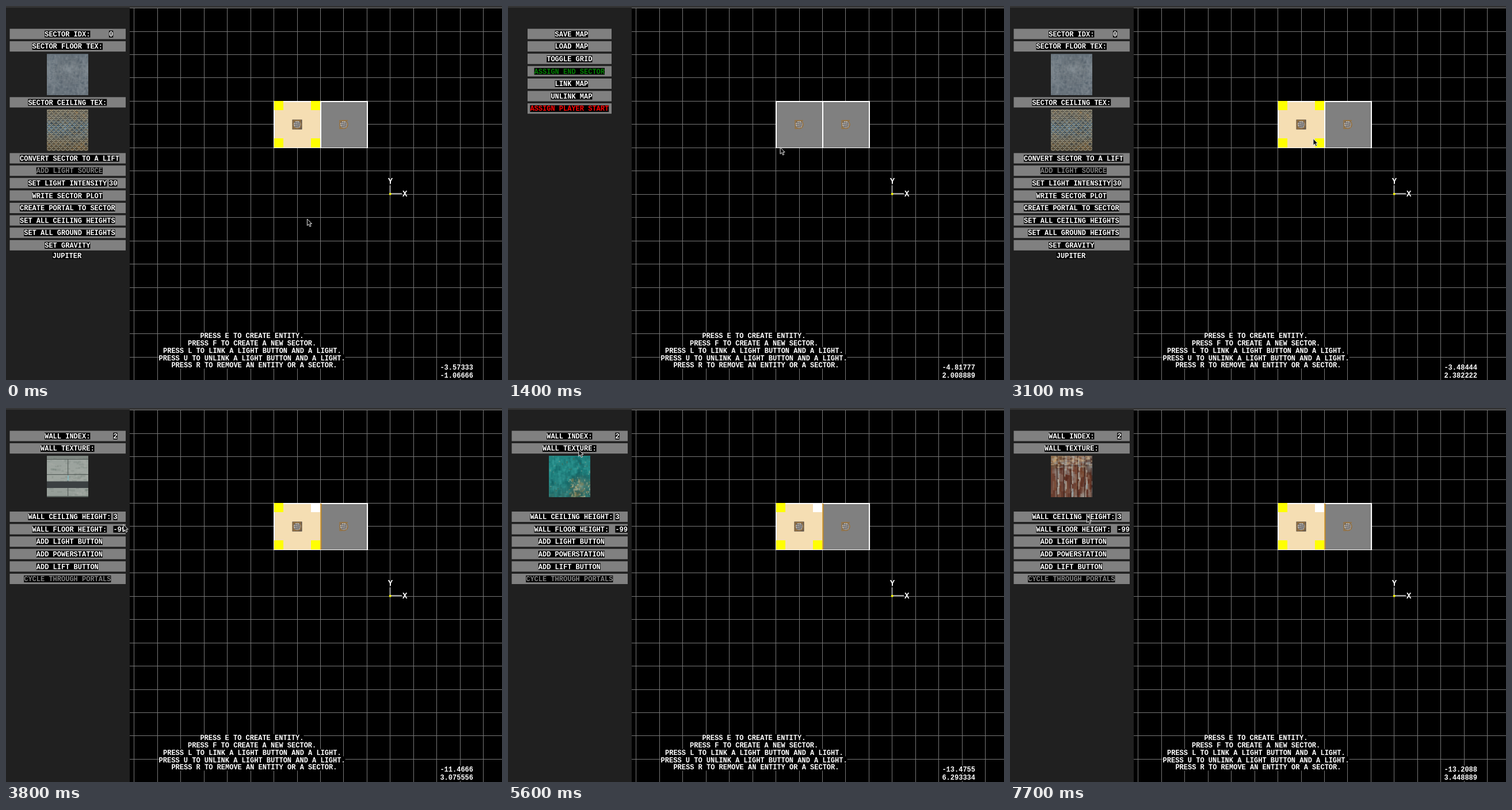
An HTML page with a canvas for the animation above (8 s loop, 862 by 650 pixels).

```html
<!DOCTYPE html>
<html lang="en">
<head>
<meta charset="utf-8">
<title>Map editor</title>
<style>
  html, body { margin: 0; width: 100%; height: 100%; overflow: hidden; background: #000; }
  #stage { position: relative; width: 862px; height: 650px; overflow: hidden; }
  #stage > * { position: absolute; left: 0; top: 0; }
  text { font: bold 12px "Liberation Mono", monospace; white-space: pre; }
  .axis { font-size: 14px; }
  .crisp { shape-rendering: crispEdges; }
</style>
</head>
<body>
<div id="stage">
  <svg id="scene" width="862" height="650"></svg>
  <svg id="cursor" width="14" height="18" viewBox="-1 -1 14 18">
    <path d="M0 0V11.6L2.7 9.2L4.6 13.4L6.7 12.5L4.8 8.4H8.2Z" fill="#111" stroke="#e8e8e8"/>
  </svg>
</div>
<script>
const LOOP = 8000, STEP = 100, CHAR = 7.2;
const ORIGIN = { x: 667.9, y: 326.9 }, CELL = 40.45, UNIT = 56.25;
const DIM = '#808080';
const stage = document.getElementById('stage');
const scene = document.getElementById('scene');
const cursor = document.getElementById('cursor');

const rect = (x, y, w, h, fill, extra = '') =>
  `<rect x="${x}" y="${y}" width="${w}" height="${h}" fill="${fill}" ${extra}/>`;
const line = (x1, y1, x2, y2, color, width = 1) =>
  `<path d="M${x1} ${y1}L${x2} ${y2}" stroke="${color}" stroke-width="${width}"/>`;
const label = (x, y, text, color = '#fff', id = '') =>
  rect(x, y - 5.8, text.length * CHAR, 11.8, '#000') +
  `<text x="${x}" y="${y + 4.2}" fill="${color}" ${id && `id="${id}"`}>${text}</text>`;

// Panel rows: slot, column, caption, colour, value
function panel(id, left, width, valueX, rows) {
  const body = rows.map(([slot, col, text, color, value]) => {
    const y = 48.6 + 21.6 * slot;
    return rect(left, y - 9, width, 18, DIM) + label(9.6 + CHAR * col, y, text, color) +
      (value ? label(valueX, y, value) : '');
  }).join('');
  return `<g id="${id}">${body}${id === 'sectorPanel' ? label(80.8, 433.6, 'JUPITER') : ''}</g>`;
}

function grid() {
  let out = '';
  for (let i = 0; i < 16; i++) {
    const x = Math.floor(222.9 + i * CELL) + .5, y = Math.floor(3.6 + i * CELL) + .5;
    out += line(x, 3, x, 650, '#777') + line(215, y, 862, y, '#777');
  }
  return `<g class="crisp">${out}</g>`;
}

function lamp(x, y, id = '') {
  let mesh = '';
  for (let i = -4; i <= 4; i += 4) mesh += `M${x - 6} ${y + i}l12 ${-i / 2}M${x + i} ${y - 6}l${-i / 2} 12`;
  return (id && rect(x - 8, y - 8, 16, 16, '#75624b', `id="${id}" stroke="#4c4540"`)) +
    `<circle cx="${x}" cy="${y}" r="7" fill="#b9b5ae" stroke="#95703f" stroke-width="1.6"/>` +
    `<path d="${mesh}" stroke="#5c5a5c" stroke-width=".9"/>` +
    `<path d="M${x - 7} ${y - 3}V${y - 7}H${x + 7}M${x - 7} ${y + 3}v4h4" fill="none" stroke="#98733f" stroke-width="1.3"/>`;
}

const handle = (x, y, id = '') => rect(x, y, 16, 16, '#ff0', id && `id="${id}"`);
const help = [
  [337.4, 'PRESS E TO CREATE ENTITY.'],
  [316, 'PRESS F TO CREATE A NEW SECTOR.'],
  [273, 'PRESS L TO LINK A LIGHT BUTTON AND A LIGHT.'],
  [265.6, 'PRESS U TO UNLINK A LIGHT BUTTON AND A LIGHT.'],
  [287.4, 'PRESS R TO REMOVE AN ENTITY OR A SECTOR.']
];

scene.innerHTML =
  rect(0, 0, 862, 650, '#000') + grid() +
  rect(0, 0, 862, 3, '#343434') + rect(0, 3, 215, 647, '#202020') +
  rect(466, 166, 81, 80.5, DIM, 'id="sector"') + rect(547, 166, 81, 80.5, DIM) +
  `<path class="crisp" d="M466 166H628V246.5H466ZM547 166V246.5" fill="none" stroke="#fff" stroke-width="1.6"/>` +
  `<g id="handles">${handle(466, 165)}${handle(530, 165, 'corner')}${handle(466, 230)}${handle(530, 230)}</g>` +
  `<g id="wall">${line(547.3, 166, 547.3, 246, '#c98a1c', 2)}${line(628.3, 166, 628.3, 247, '#fff', 1.6)}</g>` +
  lamp(506, 206, 'lampBox') + lamp(587, 206) +
  line(667.5, 312, 667.5, 327, '#ddd', 1.4) + line(668, 326, 688, 326, '#ddd', 1.4) +
  rect(666, 325, 3.4, 3.4, '#ff0') +
  '<text class="axis" x="663.8" y="309" fill="#fff">Y</text><text class="axis" x="689" y="331" fill="#fff">X</text>' +
  help.map(([x, text], i) => label(x, 572.6 + 12.9 * i, text)).join('') +
  label(754.4, 627.4, '        ', '#fff', 'readX') + label(754.4, 641.8, '        ', '#fff', 'readY') +
  panel('mapPanel', 34, 146, 0, [
    [0, 10, 'SAVE MAP'], [1, 10, 'LOAD MAP'], [2, 8, 'TOGGLE GRID'],
    [3, 5, 'ASSIGN END SECTOR', '#008000'], [4, 10, 'LINK MAP'], [5, 9, 'UNLINK MAP'],
    [6, 4, 'ASSIGN PLAYER START', '#f00']
  ]) +
  panel('sectorPanel', 6.5, 201.5, 179, [
    [0, 8, 'SECTOR IDX:', '#fff', '0'], [1, 5, 'SECTOR FLOOR TEX:'], [5.5, 4, 'SECTOR CEILING TEX:'],
    [10, 2, 'CONVERT SECTOR TO A LIFT'], [11, 6, 'ADD LIGHT SOURCE', DIM],
    [12, 4, 'SET LIGHT INTENSITY', '#fff', '30'], [13, 5, 'WRITE SECTOR PLOT'],
    [14, 2, 'CREATE PORTAL TO SECTOR'], [15, 2, 'SET ALL CEILING HEIGHTS'],
    [16, 3, 'SET ALL GROUND HEIGHTS'], [17, 8, 'SET GRAVITY']
  ]) +
  panel('wallPanel', 6.5, 201.5, 186.4, [
    [0, 8, 'WALL INDEX:', '#fff', '2'], [1, 7, 'WALL TEXTURE:'],
    [6.5, 4, 'WALL CEILING HEIGHT:', '#fff', '3'], [7.5, 5, 'WALL FLOOR HEIGHT:', '#fff', '-99'],
    [8.5, 6, 'ADD LIGHT BUTTON'], [9.5, 6, 'ADD POWERSTATION'], [10.5, 6, 'ADD LIFT BUTTON'],
    [11.5, 3, 'CYCLE THROUGH PORTALS', DIM]
  ]);

function texture(top, paint) {
  const canvas = document.createElement('canvas');
  canvas.width = canvas.height = 72;
  canvas.style.cssText = `left:71px;top:${top}px`;
  stage.insertBefore(canvas, cursor);
  const g = canvas.getContext('2d');
  let seed = 7;
  const rnd = () => (seed = seed * 16807 % 2147483647) / 2147483647;
  const fill = (color, x = 0, y = 0, w = 72, h = 72) => { g.fillStyle = color; g.fillRect(x, y, w, h); };
  const shade = (...colors) => {
    const grad = g.createLinearGradient(0, 0, 0, 72);
    colors.forEach((c, i) => grad.addColorStop(i / (colors.length - 1), c));
    fill(grad);
  };
  const glow = (x, y, r, color) => {
    const grad = g.createRadialGradient(x, y, 0, x, y, r);
    grad.addColorStop(0, color);
    grad.addColorStop(1, 'transparent');
    fill(grad);
  };
  const specks = (count, colors, w, h, x = 0, y = 0, spanX = 72, spanY = 72) => {
    for (let i = 0; i < count; i++)
      fill(colors[i % colors.length], x + rnd() * spanX, y + rnd() * spanY, w * (.4 + rnd()), h * (.4 + rnd()));
  };
  paint({ g, rnd, fill, shade, glow, specks });
  return canvas;
}

const concrete = texture(83, p => {
  p.shade('#68737c', '#7b858c', '#747e86', '#68727a');
  p.glow(38, 28, 30, 'rgba(150,160,165,.35)');
  p.specks(500, ['rgba(155,165,170,.14)', 'rgba(60,72,84,.14)'], 3, 4);
  p.fill('rgba(60,70,78,.5)', 0, 0, 72, 1);
});

const tread = texture(180, p => {
  p.shade('#77705f', '#75736a', '#607d90', '#67757a', '#75664c', '#514735');
  p.glow(32, 30, 26, 'rgba(150,185,205,.45)');
  p.specks(170, ['rgba(145,108,58,.3)', 'rgba(42,53,60,.35)'], 5, 4);
  p.g.lineWidth = 1.3;
  for (let j = 0; j < 18; j++) for (let i = 0; i < 18; i++) {
    const tilt = (i + j) % 2 ? 1.5 : -1.5, x = i * 4 + 2, y = j * 4 + 2;
    for (const [offset, color] of [[1, 'rgba(25,27,28,.75)'], [0, 'rgba(195,190,165,.65)']]) {
      p.g.strokeStyle = color;
      p.g.beginPath();
      p.g.moveTo(x - 1.6, y - tilt + offset);
      p.g.lineTo(x + 1.6, y + tilt + offset);
      p.g.stroke();
    }
  }
});

const panels = texture(83, p => {
  p.shade('#99a19c', '#a0a7a1', '#939c96');
  p.specks(150, ['rgba(185,190,183,.15)', 'rgba(75,85,80,.13)'], 7, 3);
  p.fill('#7b837e', 0, 0, 72, 4);
  p.fill('#505854', 0, 5, 72, 1.5);
  p.fill('#5a625e', 36, 6, 1.2, 66);
  p.fill('#565e5a', 0, 32, 72, 1.2);
  p.fill('#3b4042', 0, 44.5, 72, 11.5);
  p.fill('#85b8bd', 36, 34, 2, 9);
  p.fill('#555d59', 0, 70, 72, 2);
});

const teal = texture(83, p => {
  p.shade('#21827f', '#258d89', '#25817e', '#316f69');
  p.specks(380, ['rgba(60,165,158,.25)', 'rgba(12,85,88,.25)', 'rgba(28,120,118,.3)'], 4, 7);
  p.glow(55, 53, 25, 'rgba(150,168,145,.75)');
  p.specks(130, ['rgba(175,180,150,.6)', 'rgba(60,120,110,.55)', 'rgba(150,130,80,.4)'], 3, 3, 34, 38, 38, 34);
  p.specks(40, ['rgba(135,165,145,.45)', 'rgba(75,90,70,.5)'], 2, 3);
  p.glow(46, 70, 13, 'rgba(170,145,80,.5)');
});

const rust = texture(83, p => {
  p.shade('#927660', '#754534', '#694034', '#785140');
  p.specks(150, ['rgba(88,40,28,.5)', 'rgba(125,75,52,.4)', 'rgba(155,150,145,.35)'], 5, 16);
  p.glow(8, 8, 20, 'rgba(215,165,100,.8)');
  p.glow(70, 18, 18, 'rgba(155,165,168,.7)');
  for (let x = 10; x < 72; x += 12) {
    p.fill('rgba(48,32,28,.65)', x, 0, 1.5, 72);
    p.specks(14, ['rgba(190,185,172,.6)', 'rgba(150,162,166,.5)'], 2, 11, x + 1, 0, 3, 66);
  }
  p.specks(60, ['rgba(205,185,150,.45)', 'rgba(160,165,165,.4)'], 6, 3, 0, 0, 72, 20);
  p.fill('rgba(50,38,32,.5)', 0, 17, 72, 1);
});

// Pointer path: time, then position in steps of 1/56.25 map unit
const path = [
  [0, -201, -60], [200, -201, -60], [300, -200, -60], [900, -200, -60],
  [1300, -262, 80], [1500, -281, 146], [1600, -270, 150], [1800, -198, 138],
  [2100, -196, 134], [3200, -196, 134], [3500, -182, 212], [3900, -800, 160],
  [4100, -800, 160], [4400, -822, 178], [5000, -756, 298], [5200, -756, 370],
  [5300, -756, 370], [5600, -758, 354], [6100, -758, 354], [6200, -762, 354],
  [6700, -762, 354], [7400, -744, 188], [7500, -744, 188], [7700, -743, 194], [LOOP, -743, 194]
];

function pointer(t) {
  const i = path.findIndex(k => k[0] > t);
  const [t0, x0, y0] = path[i - 1], [t1, x1, y1] = path[i];
  const f = (t - t0) / (t1 - t0);
  return [x0 + (x1 - x0) * f, y0 + (y1 - y0) * f].map(v => Math.round(v) / UNIT);
}

const byId = id => document.getElementById(id);
const show = (el, on) => { el.style.visibility = on ? 'visible' : 'hidden'; };
const digits = v => Math.fround(v).toFixed(6).slice(0, 8);

function render(time) {
  const t = Math.floor(time / STEP) * STEP;
  const mapMode = t >= 600 && t < 3100, wallMode = t >= 3600;
  const sectorMode = !mapMode && !wallMode;
  show(byId('mapPanel'), mapMode);
  show(byId('sectorPanel'), sectorMode);
  show(byId('wallPanel'), wallMode);
  show(byId('handles'), !mapMode);
  show(byId('lampBox'), !mapMode);
  show(byId('wall'), wallMode);
  byId('sector').setAttribute('fill', mapMode ? DIM : '#f5deb3');
  byId('corner').setAttribute('fill', wallMode ? '#fff' : '#ff0');

  show(concrete, sectorMode || (t >= 6000 && t < 6400));
  show(tread, sectorMode);
  show(panels, wallMode && t < 5500);
  show(teal, t >= 5500 && t < 6000);
  show(rust, t >= 6400);

  const [x, y] = pointer(t);
  byId('readX').textContent = digits(x);
  byId('readY').textContent = digits(y);
  cursor.style.transform =
    `translate(${ORIGIN.x + x * CELL - 1}px, ${ORIGIN.y - y * CELL - 1}px)`;
}

const start = performance.now();
function tick() {
  render((performance.now() - start) % LOOP);
  requestAnimationFrame(tick);
}
tick();
</script>
</body>
</html>
```
